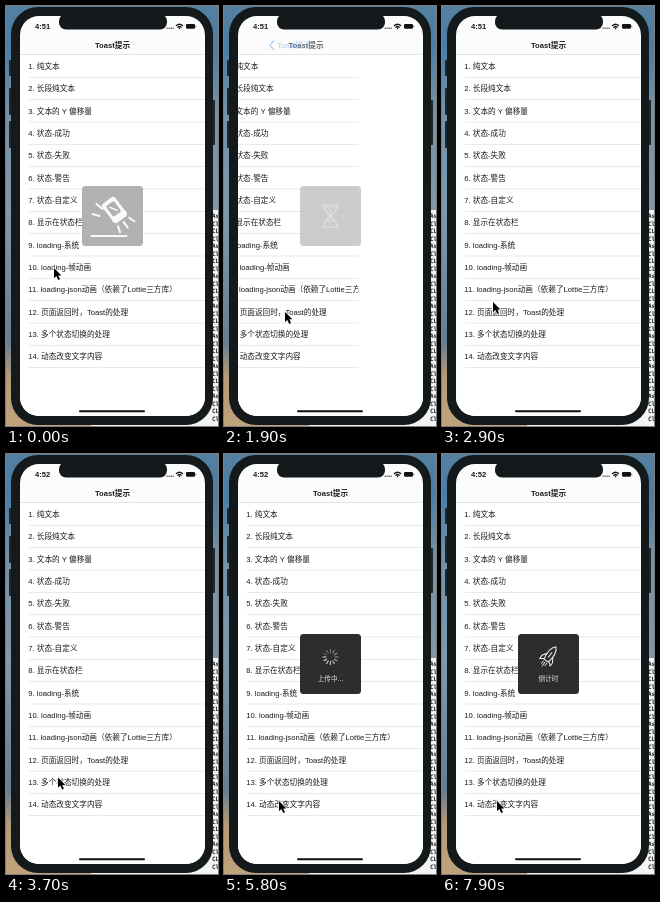
Animation of 212 by 420 pixels, one loop 8 s. Source, as an HTML page with a canvas:

```html
<!DOCTYPE html>
<html lang="zh">
<head>
<meta charset="utf-8">
<style>
html, body { margin: 0; width: 100%; height: 100%; overflow: hidden; background: #141a1b; }
canvas { display: block; width: 212px; height: 420px; }
</style>
</head>
<body>
<canvas id="stage"></canvas>
<script>
const LOOP = 8000;
const SANS = '"Liberation Sans", "Noto Sans CJK SC", "Noto Sans CJK", sans-serif';
const MONO = '"DejaVu Sans Mono", monospace';
const SCREEN = { x: 14, y: 10, w: 185, h: 400 };
const ROW = 22.35, NAV_BOTTOM = 49, MID = 106.5;
const ROWS = ['纯文本', '长段纯文本', '文本的 Y 偏移量', '状态-成功', '状态-失败', '状态-警告',
  '状态-自定义', '显示在状态栏', 'loading-系统', 'loading-帧动画',
  'loading-json动画（依赖了Lottie三方库）', '页面返回时，Toast的处理',
  '多个状态切换的处理', '动态改变文字内容'];

const canvas = document.getElementById('stage');
const c = canvas.getContext('2d');
const ratio = window.devicePixelRatio || 1;
canvas.width = 212 * ratio;
canvas.height = 420 * ratio;

const clamp = v => Math.max(0, Math.min(1, v));
const ramp = (t, from, to) => clamp((t - from) / (to - from));
const easeOut = u => 1 - (1 - u) ** 4;
const smooth = u => u * u * (3 - 2 * u);

function box(x, y, w, h, r, color) {
  c.beginPath();
  c.roundRect(x, y, w, h, r);
  c.fillStyle = color;
  c.fill();
}

function text(str, x, y, { size = 7.65, weight = 400, color = '#1c1c1c', align = 'left', family = SANS } = {}) {
  c.font = `${weight} ${size}px ${family}`;
  c.textAlign = align;
  c.textBaseline = 'alphabetic';
  c.fillStyle = color;
  c.fillText(str, x, y + size * 0.36);
}

function stroke(path, color, width) {
  c.strokeStyle = color;
  c.lineWidth = width;
  c.lineCap = c.lineJoin = 'round';
  c.stroke(new Path2D(path));
}

function layer(draw, { x = 0, y = 0, turn = 0, alpha = 1 }) {
  c.save();
  c.translate(x, y);
  c.rotate(turn);
  c.globalAlpha *= alpha;
  draw();
  c.restore();
}

// Desktop and phone

function drawDesktop() {
  const sky = c.createLinearGradient(0, 0, 0, 420);
  [[0, '#55809f'], [0.1, '#4b7da6'], [0.25, '#7392a8'], [0.5, '#8098ab'], [0.8, '#667d92'], [0.88, '#b39a78'], [1, '#c0a37c']]
    .forEach(([at, color]) => sky.addColorStop(at, color));
  c.fillStyle = sky;
  c.fillRect(0, 0, 212, 420);
  box(85, 204, 127, 216, 0, '#f4f4f4');
  const ink = { size: 6, family: MONO, color: '#222', weight: 700 };
  for (let i = 0; i < 28; i++) text(['As', 'Cl', 'CL', 'Cl'][i % 4], 206, 210 + i * 7.5, ink);
  text('create "release" master ->', 86, 416, ink);
}

function drawPhone() {
  [[3, 54, 16], [3, 82, 27], [3, 115, 27], [205, 94, 45]].forEach(([x, y, h]) => box(x, y, 4, h, 1, '#20272a'));
  box(5, 1, 202, 418, 27, '#141a1b');
}

function drawStatus(t) {
  box(53, 8, 108, 15.5, 7, '#141a1b');
  text(t < 3300 ? '4:51' : '4:52', 29, 20.7, { weight: 700, size: 7.6 });
  for (let i = 0; i < 4; i++) box(160.5 + i * 2, 21.5, 1.3, 1.3, 0.6, '#222');
  stroke('M170.4 19.6Q173.5 16.9 176.6 19.6M171.8 21.2Q173.5 19.8 175.2 21.2M173.4 22.5h.2', '#111', 1.3);
  box(180, 18, 9, 4.8, 1.3, '#111');
  box(189.4, 19.5, 0.8, 1.8, 0.4, '#555');
}

// Screens

function drawList() {
  box(SCREEN.x, NAV_BOTTOM, SCREEN.w, 361, 0, '#fff');
  ROWS.forEach((label, i) => {
    const top = NAV_BOTTOM + i * ROW;
    text(`${i + 1}. ${label}`, 22.3, top + ROW / 2);
    box(23, top + ROW - 0.4, 176, 0.5, 0, '#d4d4d4');
  });
}

function drawScreens(t) {
  const pushed = t < 2450 ? easeOut(ramp(t, 1850, 2350)) : 1 - easeOut(ramp(t, 2450, 2900));
  c.save();
  c.beginPath();
  c.roundRect(SCREEN.x, SCREEN.y, SCREEN.w, SCREEN.h, 19);
  c.clip();
  box(SCREEN.x, SCREEN.y, SCREEN.w, SCREEN.h, 0, '#fcfcfc');
  layer(drawList, { x: -pushed * SCREEN.w * 0.3 });
  box(SCREEN.x + (1 - pushed) * SCREEN.w, NAV_BOTTOM, SCREEN.w, 361, 0, '#fff');
  box(SCREEN.x, NAV_BOTTOM - 0.4, SCREEN.w, 0.5, 0, '#d0d0d0');
  layer(() => text('Toast提示', MID, 39.4, { weight: 700, align: 'center' }), { x: -70 * pushed, alpha: 1 - pushed });
  layer(() => {
    stroke('M23.8 35L19.8 39.3L23.8 43.6', '#1f7cf0', 1.3);
    text('Toast提示', 27, 39.4, { color: '#1f7cf0' });
  }, { x: 40 * (1 - pushed), alpha: pushed });
  drawStatus(t);
  box(73, 404.3, 66, 2, 1, '#111');
  c.restore();
}

// Toast contents, drawn around the middle of the box

function caption(str) {
  text(str, 0, 14.6, { size: 6.7, color: '#e2e2e2', align: 'center' });
}

function spinner(t) {
  const head = Math.floor(t / 1000 * 12);
  for (let i = 0; i < 12; i++) {
    const age = (((head - i) % 12) + 12) % 12;
    layer(() => box(-0.6, -8, 1.2, 4, 0.6, '#fff'), { y: -7, turn: i * Math.PI / 6, alpha: 0.9 - age * 0.06 });
  }
}

function lamp() {
  layer(() => {
    box(-8, -17, 16, 24, 3, '#fff');
    box(-5, -13, 10, 13, 2, '#aaa');
    stroke('M-8 3H8M-2 -10L2 -3', '#fff', 1.5);
    stroke('M-7 10L-9 16M0 10V17M7 10L9 16', '#fff', 2);
  }, { x: 5, y: -2, turn: -0.65 });
  stroke('M-20 -2L-13 0M-16 -12L-10 -7M-21 20H14', '#fff', 2);
}

function hourglass(t) {
  const flip = smooth(ramp(t, 1200, 1650)) * Math.PI;
  layer(() => {
    stroke('M-8 -11H8M-8 11H8M-6 -11V-8C-6 -4 -1 -2 -1 0C-1 2 -6 4 -6 8V11M6 -11V-8C6 -4 1 -2 1 0C1 2 6 4 6 8V11', '#f2f2f2', 1.2);
    stroke('M-3 -5H3L0 -2ZM0 0V5M-4 9L0 5L4 9Z', '#f2f2f2', 0.9);
  }, { turn: flip });
}

function check() {
  c.beginPath();
  c.arc(-0.3, -7.5, 11.3, 0, 7);
  c.fillStyle = '#606060';
  c.fill();
  stroke('M-5.3 -7.2L-1.6 -3.6L5 -10.7', '#fff', 1.4);
}

function rocket(t) {
  const flame = 5 + Math.sin(t / 60) * 1.2;
  layer(() => {
    stroke('M0 -12C4 -8 4 -1 2.5 5H-2.5C-4 -1 -4 -8 0 -12ZM-3.2 -2L-6.5 3V7L-2.5 4M3.2 -2L6.5 3V7L2.5 4M0 -5V1', '#eee', 1);
    stroke(`M-2 7V${7 + flame * 0.6}M0 7V${7 + flame}M2 7V${7 + flame * 0.6}`, '#eee', 0.9);
  }, { x: 0.5, y: -7.5, turn: 0.62 });
}

const TOASTS = [
  { from: -74, to: 450, draw: lamp },
  { from: 500, to: 1750, draw: hourglass },
  { from: 1900, to: 2500, draw: t => { spinner(t); caption('loading'); } },
  { from: 4000, to: 6950, draw: t => {
    if (t < 6500) { spinner(t); caption('上传中...'); }
    else { check(); caption('上传完成'); }
  } },
  { from: 7500, to: 9000, draw: t => { rocket(t); caption('倒计时'); } }
];

function drawToasts(t) {
  for (const { from, to, draw } of TOASTS) {
    const shown = Math.min(ramp(t, from, from + 200), 1 - ramp(t, to, to + 200));
    if (shown <= 0) continue;
    layer(() => {
      layer(() => box(-30.5, -30, 61, 60, 3.5, '#fff'), { alpha: clamp(shown * 3) });
      layer(() => box(-30.5, -30, 61, 60, 3.5, '#2d2d2e'), { alpha: shown });
      layer(() => draw(t), { alpha: clamp(shown * 2.5) });
    }, { x: MID, y: 210 });
  }
}

// Pointer: time, x, y
const PATH = [[0, 48, 262], [150, 48, 262], [450, 53, 282], [600, 53, 282], [1000, 60, 300], [1500, 61, 304],
  [1800, 61, 304], [2200, 61, 316], [2500, 61, 314], [2900, 51, 296], [3100, 51, 297], [3800, 52, 325],
  [4100, 52, 325], [4600, 55, 347], [LOOP, 55, 347]];

function drawPointer(t) {
  const i = PATH.findIndex(p => p[0] > t);
  const [t0, x0, y0] = PATH[i - 1], [t1, x1, y1] = PATH[i];
  const u = smooth(ramp(t, t0, t1));
  layer(() => {
    const arrow = 'M0 0V10.2L2.4 8L4.2 12L6 11.2L4.3 7.4H7.4Z';
    stroke(arrow, '#fff', 1.3);
    c.fillStyle = '#000';
    c.fill(new Path2D(arrow));
  }, { x: x0 + (x1 - x0) * u, y: y0 + (y1 - y0) * u });
}

function frame(now) {
  const t = now % LOOP;
  c.setTransform(ratio, 0, 0, ratio, 0, 0);
  drawDesktop();
  drawPhone();
  drawScreens(t);
  drawToasts(t);
  drawPointer(t);
  requestAnimationFrame(frame);
}

const start = performance.now();
requestAnimationFrame(function begin() {
  frame(0);
});
const nativeFrame = window.requestAnimationFrame;
</script>
</body>
</html>
```
